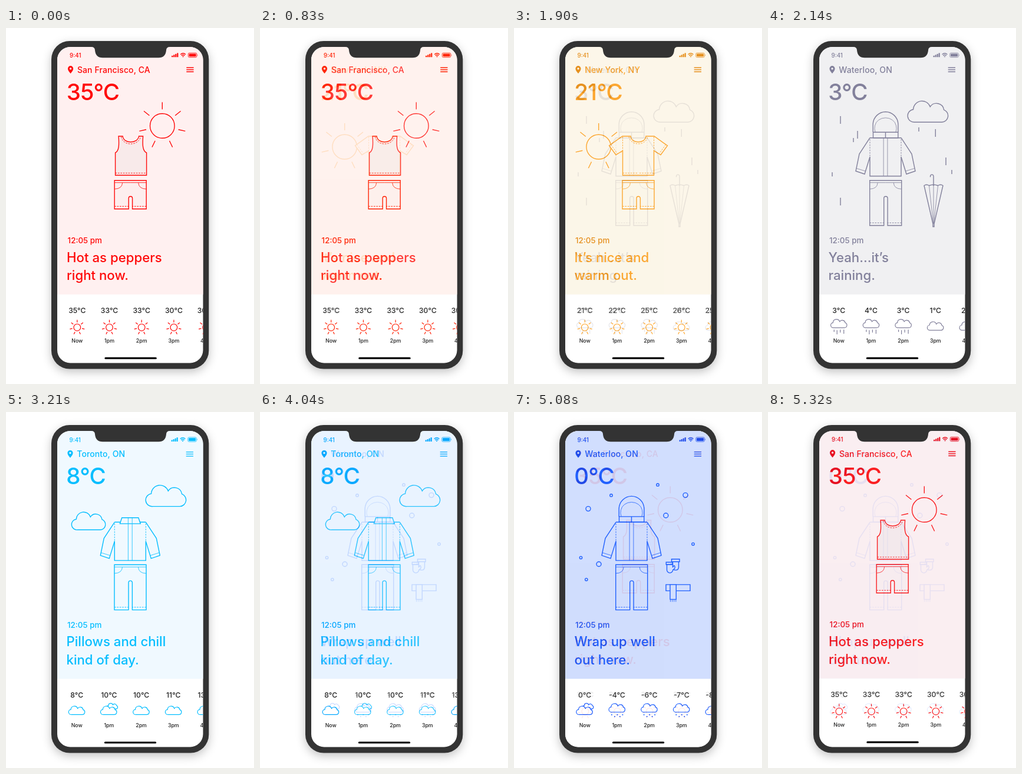
Animation of 421x602 px, one loop 5.35 s. Source, as an HTML page:

```html
<!DOCTYPE html>
<html lang="en">
<head>
<meta charset="utf-8">
<title>Weather wardrobe</title>
<style>
  html, body { margin: 0; width: 100%; height: 100%; overflow: hidden; background: #fff; }
  svg { display: block; width: 421px; height: 602px; }
  text { font-family: Inter, "Open Sans", sans-serif; }
  .phone { filter: drop-shadow(0 5px 8px rgba(0, 0, 0, .24)); }
  .art { fill: none; stroke-width: 1.4; }
  .art * { vector-effect: non-scaling-stroke; }
  .thin { stroke-width: .8; }
  .dash { stroke-width: .9; stroke-dasharray: 2.6 1.8; fill: none; }
</style>
</head>
<body>
<svg id="stage" viewBox="0 0 421 602" xmlns="http://www.w3.org/2000/svg">
  <defs>
    <clipPath id="screen"><rect x="87" y="32" width="247.5" height="534.5" rx="22"/></clipPath>
  </defs>
  <rect class="phone" x="77" y="22" width="267.3" height="554.5" rx="31" fill="#333"/>
  <g id="scenes" clip-path="url(#screen)"></g>
  <path fill="#333" d="M145 31H278V32Q272.3 32 272 37.5Q271 50.3 259 50.3H164Q152 50.3 151 37.5Q150.7 32 145 32Z"/>
</svg>
<script>
const HOLD = 800, STEP = 30, SPAN = 1070, LOOP = 5350;
const COLUMN = 54.7;

const path = (d, extra = '') => `<path d="${d}" ${extra}/>`;
const text = (x, y, size, str, weight = 400, extra = '') =>
  `<text x="${x}" y="${y}" font-size="${size}" font-weight="${weight}" ${extra}>${str}</text>`;
const circle = (x, y, r, extra = '') => `<circle cx="${x}" cy="${y}" r="${r}" ${extra}/>`;
const at = (x, y, body, scale = 1) =>
  `<g transform="translate(${x} ${y}) scale(${scale})">${body}</g>`;
const mirrored = (cx, body) =>
  `<g transform="translate(${cx} 0)">${body}<g transform="scale(-1 1)">${body}</g></g>`;

// Weather shapes
function sun(x, y, radius, inner, outer) {
  let rays = '';
  for (let i = 0; i < 7; i++) {
    const a = i * 2 * Math.PI / 7, s = Math.sin(a), c = -Math.cos(a);
    rays += `M${x + s * inner} ${y + c * inner}L${x + s * outer} ${y + c * outer}`;
  }
  return circle(x, y, radius) + path(rays);
}

const cloud = (x, y, scale = 1, fill = 'none') => at(x, y, path(
  'M11 36.5H57A10.8 10.8 0 0 0 60.3 15.6A12.8 12.8 0 0 0 37 10.5' +
  'A14.8 14.8 0 0 0 8.3 15A10.8 10.8 0 0 0 11 36.5Z', `fill="${fill}"`), scale);

const drops = list => path(list.map(([x, y, len]) => `M${x} ${y}v${len}`).join(''));

const flakes = list => list.map(([x, y, r]) => circle(x, y, r)).join('');

// Clothes
function legs(cx, bottom, fill) {
  return path(`M${cx - 27} 257.7h54V${bottom}h-23.6V288a3.2 3.2 0 0 0 -6.4 0V${bottom}h-24Z`, `fill="${fill}"`) +
    mirrored(cx, path('M0 261.5H-27M-13.5 261.5Q-14 272 -27 272.3', 'class="thin"') +
      path(`M-27 ${bottom - 4.5}H-3`, 'class="dash"'));
}

function tankTop(fill) {
  return path('M190.5 183H197.5C199 196 223 196 225 183H232C231 197 231 208 238 211' +
      'V249H185V211C191.5 208 191.5 197 190.5 183Z', `fill="${fill}"`) +
    path('M195 184C198 200 224 200 228 184M185 245.3H238', 'class="dash"');
}

function tShirt(fill) {
  return path('M198 183C199 196 223 196 224 183H238L260.5 199L249 214.5L237.5 207.5' +
      'V249H184.5V207.5L173 214.5L161.5 199L184 183Z', `fill="${fill}"`) +
    path('M195 183.5C198 200 224 200 227 183.5', 'class="dash"') +
    mirrored(211, path('M-26.5 184V207M-46.5 197.2L-35.5 212.5M-26.5 245.3H0', 'class="dash"'));
}

function jacket(cx, fill, hooded) {
  const half = path('M-26.5 185.7L-44.5 213L-50.5 242L-35.5 247L-26.5 218', `fill="${fill}"`) +
    path('M-49.4 237.3L-34.2 242M-3.4 186V250.5', 'class="thin"') +
    path('M-26.5 188V218', 'class="dash"');
  const hood = path('M-21.3 176.3V162A21.4 21.7 0 0 1 21.4 162V176.3', `fill="${fill}"`) +
    path('M-17.5 176Q-19.5 170 -18 165A18.3 16 0 0 1 18 165Q19.5 170 17.5 176', 'class="thin"') +
    path('M-21 176.3H21.3V185.7H-21ZM0 176.3V185.7');
  const collar = path('M-17.5 188.3L-14 178.2H14L17.5 188.3Z', `fill="${fill}"`) +
    path('M-3.4 178.2V188M3.4 178.2V188', 'class="thin"');
  return mirrored(cx, half) +
    at(cx, 0, path('M-26.5 218V250.5H26.5V218M-26.5 185.7H26.5') + (hooded ? hood : collar));
}

const umbrella = path('M275.7 252.2C274.5 247 281 246.3 281 251V267') +
  path('M265 266.5Q269 263.5 273.5 266.5Q281 263.5 288.5 266.5Q293 263.5 297 266.5L282 331V336H280V331Z') +
  path('M273.5 266.5L280.6 331M288.5 266.5L281.4 331M281 266V331', 'class="thin"');

function winterExtras(fill) {
  const mitten = path('M1.5 4.2V14A5.3 5.3 0 0 0 12 14V4.2M1.5 9Q-3.5 7 -3 12Q-1 15 1.6 14', `fill="${fill}"`) +
    path('M0 0H13.5V4.4H0Z', `fill="${fill}"`);
  return at(267.5, 248.2, mitten) +
    path('M258.3 253.4H269.5V257.4H258.3Z') +
    path('M259.5 257.4V266.4A5 5 0 0 0 269.7 266.4Q275 263.4 272.5 259.4Q270 259.4 269.5 262.4V257.4Z', `fill="${fill}"`) +
    path('M258 291.3H299V301.8H258Z') +
    path('M265 291.3H275.3V316.3H265Z', `fill="${fill}"`) +
    path('M265.5 316.3V320.5M268.6 316.3V320.5M271.7 316.3V320.5M274.8 316.3V320.5', 'class="thin"');
}

// Forecast icons, drawn around x = 0
const icons = {
  sun: () => sun(0, 506.3, 5.8, 8.4, 12.8),
  cloud: () => cloud(-13.4, 496.5, .4),
  clouds: () => cloud(-3.2, 491.8, .265) + cloud(-13.9, 496.5, .4, '#fff'),
  rain: () => cloud(-13.2, 492.3, .4) +
    drops([[-8, 510, 4], [-3, 511, 7], [2.5, 510, 5], [8.5, 510, 7]]),
  snow: () => cloud(-13.4, 492.3, .4) +
    [-9, -4, .5, 5, 9.5].map((x, i) =>
      circle(x, i % 2 ? 514.4 : 511.3, 1, 'fill="currentColor" stroke="none"')).join('')
};

const statusBar = () =>
  text(107.5, 50, 9.8, '9:41', 500) +
  [2.6, 4, 5.5, 7].map((h, i) =>
    `<rect x="${280.6 + i * 3}" y="${49.3 - h}" width="2.2" height="${h}" rx=".6"/>`).join('') +
  path('M295.6 44.8Q300 40.8 304.4 44.8M297.2 46.8Q300 44.3 302.8 46.8',
    'fill="none" stroke="currentColor" stroke-width="1.4"') +
  path('M298.4 48L300 49.6L301.6 48Q300 46.9 298.4 48Z') +
  '<rect x="308.7" y="42.2" width="14.6" height="7.4" rx="2" fill="none" stroke="currentColor" stroke-width=".8"/>' +
  '<rect x="310" y="43.5" width="12" height="4.8" rx="1"/>' +
  path('M324.2 44.5Q325.6 46 324.2 47.5Z');

const header = city =>
  path('M109 77C106 73.5 104.4 71 104.4 68.7A4.6 4.6 0 0 1 113.6 68.7C113.6 71 112 73.5 109 77Z' +
    'M109 67A1.7 1.7 0 0 0 109 70.4A1.7 1.7 0 0 0 109 67Z', 'fill-rule="evenodd"') +
  text(120.3, 75.6, 14, city, 450, 'letter-spacing=".1"') +
  path('M305.7 67H318M305.7 70.5H318M305.7 74H318', 'stroke="currentColor" stroke-width="1.3"');

const scenes = [
  { color: '#ff0a0a', back: '#fff0f0', city: 'San Francisco, CA', temp: '35', lines: ['Hot as peppers', 'right now.'],
    temps: [35, 33, 33, 30, 30], sky: ['sun', 'sun', 'sun', 'sun', 'sun'], dx: .6, dy: 0,
    art: () => sun(264.7, 165.5, 20.8, 28, 40) + tankTop('#f8eaea') + legs(210.6, 306, '#fdeeee') },
  { color: '#ff9500', back: '#fff8e6', city: 'New York, NY', temp: '21', lines: ['It’s nice and', 'warm out.'],
    temps: [21, 22, 25, 26, 25], sky: ['sun', 'sun', 'sun', 'sun', 'sun'], dx: 0, dy: 0,
    art: back => sun(143.7, 201, 20.8, 28, 40) + tShirt(back) + legs(211, 306, back) },
  { color: '#82809b', back: '#f0f0f2', city: 'Waterloo, ON', temp: '3', lines: ['Yeah...it’s', 'raining.'],
    temps: [3, 4, 3, 1, 2], sky: ['rain', 'rain', 'rain', 'cloud', 'cloud'], dx: 0, dy: 0,
    art: back => cloud(238.3, 122.7) +
      drops([[123, 149, 13], [152, 174, 13], [145, 186, 7], [109, 244, 7], [123, 287, 13],
        [256, 168, 7], [284.3, 171, 13], [302, 219, 13], [312, 240, 7]]) +
      jacket(199.5, back, true) + legs(199.7, 334, back) + umbrella },
  { color: '#06beff', back: '#f0f9ff', city: 'Toronto, ON', temp: '8', lines: ['Pillows and chill', 'kind of day.'],
    temps: [8, 10, 10, 11, 13], sky: ['cloud', 'clouds', 'cloud', 'cloud', 'cloud'], dx: 0, dy: .6,
    art: back => cloud(238.3, 122.5) + cloud(112.3, 168, .84) + jacket(210.8, back, false) + legs(211, 334, back) },
  { color: '#0a52ff', back: '#ccdcff', city: 'Waterloo, ON', temp: '0', lines: ['Wrap up well', 'out here.'],
    temps: [0, -4, -6, -7, -8], sky: ['clouds', 'snow', 'snow', 'snow', 'cloud'], dx: 0, dy: .6,
    art: back => flakes([[126, 163, 4], [165, 140.3, 2.2], [244, 122.6, 2.2], [291, 140, 4], [257.8, 174.4, 4],
        [304, 222.7, 2.2], [113.5, 245.7, 2.2], [144, 256.6, 4], [122.8, 282.7, 2.2]]) +
      jacket(199.5, back, true) + legs(199.7, 334, back) + winterExtras(back) }
];

function forecast({ temps, sky }) {
  return temps.map((temp, i) => at(120.2 + i * COLUMN, 0,
    text(0, 482, 12.2, `${temp}°C`, 550, 'text-anchor="middle" fill="#222"') +
    `<g class="art" stroke="currentColor" style="stroke-width:1.2">${icons[sky[i]]()}</g>` +
    text(0, 532, 8.8, i ? `${i}pm` : 'Now', 550, 'text-anchor="middle" fill="#222"'))).join('');
}

function drawScene(scene) {
  const { color, back, dx, dy } = scene;
  return `<g class="scene" color="${color}" fill="${color}">
    <rect x="80" y="25" width="260" height="545" fill="#fff"/>
    <rect x="80" y="25" width="260" height="${425.6 + dy}" fill="${back}"/>
    <g transform="translate(${dx} ${dy})">
      ${statusBar()}${header(scene.city)}
      ${text(102.2, 121.6, 38.5, `${scene.temp}°C`, 500, 'letter-spacing="-.8"')}
      <g class="art" stroke="currentColor">${scene.art(back)}</g>
      ${text(104, 364, 13.4, '12:05 pm', 450)}
      ${scene.lines.map((line, i) => text(102.5, 395.5 + i * 30.5, 22.2, line, 480)).join('')}
      ${forecast(scene)}
      <rect x="166.8" y="556.8" width="88.4" height="3.2" rx="1.6" fill="#000"/>
    </g>
  </g>`;
}

const holder = document.getElementById('scenes');
holder.innerHTML = scenes.map(drawScene).join('');
const layers = [...holder.children];

function render(time) {
  const t = time % LOOP;
  const current = Math.floor(t / SPAN);
  const next = (current + 1) % layers.length;
  const local = t - current * SPAN;
  const mix = local < HOLD ? 0 : (Math.floor((local - HOLD) / STEP) + 1) / 10;
  const lower = Math.min(current, next);
  layers.forEach((layer, i) => {
    const weight = i === current ? 1 - mix : i === next ? mix : 0;
    layer.style.display = weight > 0 ? '' : 'none';
    // The lower of the two layers stays solid so the blend never shows the frame.
    layer.style.opacity = i === lower ? 1 : weight;
  });
}

const start = performance.now();
function tick() {
  render(performance.now() - start);
  requestAnimationFrame(tick);
}
tick();
</script>
</body>
</html>
```
